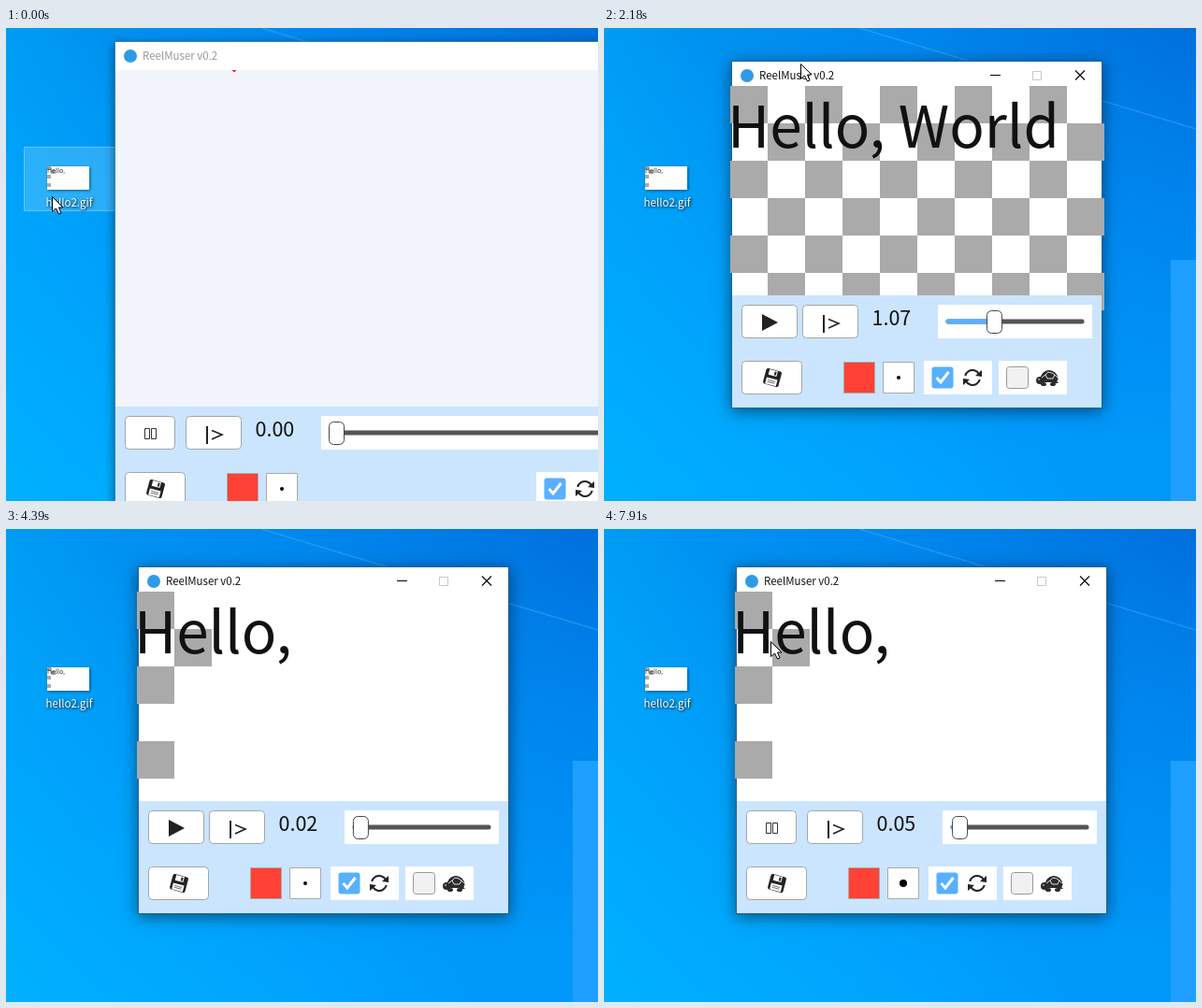
Animation of 633x506 px, one loop 7.99 s. Source, as an HTML page with a canvas:

```html
<!DOCTYPE html>
<html lang="en">
<head>
<meta charset="utf-8">
<style>
html, body { margin: 0; width: 100%; height: 100%; overflow: hidden; background: #0090ff; }
canvas { display: block; }
</style>
</head>
<body>
<canvas id="stage" width="633" height="506"></canvas>
<script>
const g = document.getElementById('stage').getContext('2d');
const FONT = '"Noto Sans CJK JP", "Noto Sans", sans-serif';
const LOOP = 7990, TICK = 78.4;
const CLIP = 3.242, CLIP_TICK = .0783; // length of the played clip, seconds per tick

// cursor path: time, x, y (y = 600 is off stage)
const PATH = [
  [0, 49, 180], [300, 60, 183], [860, 188, 166], [1010, 211, 156], [1400, 211, 156],
  [1710, 190, 17], [1840, 190, 17], [2270, 215, 43], [2400, 215, 43], [2579, 186, 160],
  [2735, 148, 332], [2900, 128, 470], [2990, 124, 510], [2991, 0, 600], [5370, 0, 600],
  [5371, 296, 67], [5480, 296, 67], [5550, 305, 67], [5760, 305, 67], [6030, 364, 495],
  [6050, 0, 600], [6180, 0, 600], [6181, 337, 421], [6340, 198, 302], [6500, 172, 318],
  [6700, 172, 318], [6960, 232, 318], [7270, 232, 318], [7430, 318, 378], [7590, 318, 378],
  [7830, 199, 110], [7910, 178, 120]
];

const clamp = x => Math.max(0, Math.min(1, x));

function cursorAt(t) {
  const i = PATH.findIndex(p => p[0] > t);
  if (i < 0) return PATH[PATH.length - 1].slice(1);
  const [t0, x0, y0] = PATH[i - 1], [t1, x1, y1] = PATH[i];
  const p = (t - t0) / (t1 - t0);
  return [Math.round(x0 + (x1 - x0) * p), Math.round(y0 + (y1 - y0) * p)];
}

function rect(x, y, w, h, fill) {
  g.fillStyle = fill;
  g.fillRect(x, y, w, h);
}

function box(x, y, w, h, r, fill, stroke) {
  g.beginPath();
  g.roundRect(x + .5, y + .5, w - 1, h - 1, r);
  g.fillStyle = fill;
  g.fill();
  if (stroke) { g.strokeStyle = stroke; g.lineWidth = 1; g.stroke(); }
}

function line(pts, color, width) {
  g.beginPath();
  for (let i = 0; i < pts.length; i += 2) g.lineTo(pts[i], pts[i + 1]);
  g.strokeStyle = color;
  g.lineWidth = width;
  g.stroke();
}

function poly(pts, fill) {
  g.beginPath();
  for (let i = 0; i < pts.length; i += 2) g.lineTo(pts[i], pts[i + 1]);
  g.closePath();
  g.fillStyle = fill;
  g.fill();
}

function dot(x, y, rx, ry, fill) {
  g.beginPath();
  g.ellipse(x, y, rx, ry, 0, 0, 7);
  g.fillStyle = fill;
  g.fill();
}

function text(s, x, y, size, fill) {
  g.font = size + 'px ' + FONT;
  g.fillStyle = fill;
  g.fillText(s, x, y);
}

function at(x, y, draw) {
  g.save();
  g.translate(x, y);
  draw();
  g.restore();
}

function shadow(color, blur, dx, dy) {
  g.shadowColor = color;
  g.shadowBlur = blur;
  g.shadowOffsetX = dx;
  g.shadowOffsetY = dy;
}

function desktop(t) {
  let grad = g.createLinearGradient(0, 0, 633, 0);
  grad.addColorStop(0, '#0098f2');
  grad.addColorStop(.5, '#0085ec');
  grad.addColorStop(1, '#0066d6');
  rect(0, 0, 633, 506, grad);
  grad = g.createLinearGradient(0, 0, 60, 506);
  grad.addColorStop(0, 'rgba(0,160,255,0)');
  grad.addColorStop(.55, 'rgba(0,155,255,.6)');
  grad.addColorStop(1, 'rgba(0,160,255,.85)');
  rect(0, 0, 633, 506, grad);
  grad = g.createLinearGradient(0, 506, 300, 250);
  grad.addColorStop(0, 'rgba(0,178,255,.9)');
  grad.addColorStop(1, 'rgba(0,178,255,0)');
  rect(0, 0, 633, 506, grad);
  line([273, 0, 633, 108], 'rgba(90,190,255,.35)', 1.5);
  rect(606, 248, 258, 258, '#1f9fff');

  if (t < 1790) box(19, 127, 104, 69, 0, `rgba(255,255,255,${t < 70 ? .17 : .24})`, 'rgba(150,215,255,.6)');
  g.save();
  shadow('rgba(0,0,0,.5)', 3, 1, 1);
  rect(44, 148, 45, 25, '#fff');
  g.restore();
  rect(44, 148, 4, 4, '#aaa');
  rect(48, 152, 5, 4, '#aaa');
  rect(44, 157, 4, 4, '#aaa');
  rect(44, 166, 4, 4, '#aaa');
  text('Hello,', 44, 155, 7, '#333');
  g.save();
  shadow('#000', 3, 1, 1);
  g.textAlign = 'center';
  text('hello2.gif', 67.5, 191, 11.5, '#fff');
  g.restore();
}

function clipView(v) {
  const n = Math.floor(v * 10 + .01);
  const cols = n ? Math.min(10, n + 1) : 2;
  rect(0, 0, 395, 220, '#fff');
  for (let c = 0; c < cols; c++)
    for (let r = c % 2; r < 6; r += 2)
      if (n || c ^ (r > 1) || r < 5 && !c) {
        if (!n && c && r > 1) continue;
        rect(c * 40 - 2, r * 40 - 4, 40, 40, '#aaa');
      }
  text('Hello, World!'.slice(0, 6 + Math.floor(n * 2 / 3)), -5, 62, 62, '#111');
}

function floppy() {
  g.rotate(.26);
  box(-9, -9, 18, 18, 2, '#222');
  rect(-5, -8, 9, 6, '#fff');
  rect(1, -7, 2, 4, '#222');
  rect(-6, 1, 12, 7, '#fff');
  line([-4, 3.5, 4, 3.5], '#777', 1);
  line([-4, 5.5, 4, 5.5], '#777', 1);
}

function repeatIcon() {
  for (let i = 0; i < 2; i++) {
    g.beginPath();
    g.arc(0, 0, 8, -2.9, -.5);
    g.strokeStyle = '#222';
    g.lineWidth = 2;
    g.stroke();
    poly([10, -8, 10, -1, 3, -2], '#222');
    g.rotate(Math.PI);
  }
}

function turtle() {
  const c = '#2b2b2b';
  dot(-8, 3, 4, 4, c);
  dot(-4, 7, 3, 2, c);
  dot(6, 7, 3, 2, c);
  poly([8, 2, 12, 6, 6, 6], c);
  g.beginPath();
  g.ellipse(2, 2, 9.5, 10, -.05, Math.PI, 0);
  g.lineTo(10, 5);
  g.lineTo(-6, 5);
  g.fill();
  line([-6, 0, -2, -3, 0, 1, 6, 1, 8, -3, 11, 0], '#ddd', 1);
  line([-2, -3, 1, -6, 5, -5, 8, -3], '#ddd', 1);
  dot(-9, 2, .8, .8, '#fff');
}

function controls(v, paused, big, brush) {
  const w = big ? 640 : 395, shift = big ? 245 : 0;
  const button = (x, y, width) => box(x, y, width, 36, 4, '#fff', '#a5a5a5');
  rect(0, 0, w, 120, '#cbe5ff');

  button(10, 10, paused ? 54 : 60);
  if (paused) {
    box(31, 23, 6, 12, 0, '#fff', '#333');
    box(38, 23, 6, 12, 0, '#fff', '#333');
  } else poly([32, 20, 32, 38, 49, 29], '#222');
  button(75, 10, 60);
  line([98, 21, 98, 40], '#222', 2);
  line([103, 25.5, 114, 30, 103, 35], '#222', 1.6);
  text(v.toFixed(2), 149.5, 32, 21.5, '#111');

  rect(220, 10, 165 + shift, 36, '#fff');
  const x = 236 + v / CLIP * 133;
  box(228, 25, 149 + shift, 6, 3, '#555');
  if (v > .03) box(228, 25, x - 228, 6, 3, '#58b0ff');
  box(x - 8, 16, 17, 25, 5, '#fff', '#444');

  button(10, 70, 65);
  at(43, 88, floppy);
  box(119, 71, 34, 34, 0, '#ff4136', '#aaa');
  box(161, 71, 34, 34, 0, '#fff', '#aaa');
  dot(178, 88, brush, brush, '#000');

  at(shift, 0, () => {
    rect(205, 70, 73, 36, '#fff');
    box(213, 76, 24, 24, 3, '#58b0ff');
    line([218.5, 88, 223, 93, 231.5, 82], '#fff', 3);
    at(257, 88, repeatIcon);
    rect(285, 70, 73, 36, '#fff');
    box(293, 76, 24, 24, 3, '#f1f1f1', '#999');
    at(337, 88, turtle);
  });
}

function appWindow(t, tick) {
  const big = t < 1000, dark = !big && t < 1150, active = t > 1790;
  const w = big ? 640 : 395, h = big ? 510 : 370, view = big ? 360 : 220;
  const paused = big || t > 4650;
  const v = big || dark ? 0 : paused ? (t > 7200 ? .05 : 0)
    : (.602 + (tick - 22) * CLIP_TICK) % CLIP;
  const drag = clamp((t - 1840) / 430);

  at(117 + Math.round(25 * drag), 15 + Math.round(26 * drag), () => {
    g.save();
    shadow('rgba(0,0,0,.5)', active ? 16 : 10, 0, 3);
    rect(-1, -1, w + 2, h + 2, active ? '#20609a' : '#3b7fb5');
    g.restore();
    rect(0, 0, w, 30, '#fff');
    dot(16, 15, 7, 7, '#2f9be8');
    text('ReelMuser v0.2', 29, 19, 11.5, active ? '#111' : '#95989d');
    if (!big) {
      const ink = active ? '#000' : '#2d6f9f';
      line([276, 14.5, 287, 14.5], active ? '#000' : '#445', 1);
      box(321, 10, 10, 10, 0, '#fff', active ? '#c8c8c8' : '#ececec');
      line([367, 9.5, 377, 19.5], ink, 1.1);
      line([377, 9.5, 367, 19.5], ink, 1.1);
    }
    if (dark) return rect(0, 30, w, 340, '#40413f');
    at(0, 30, () => {
      if (big) {
        rect(0, 0, w, view, '#f1f5fb');
        rect(125, 0, 4, 1, '#f22');
        rect(126, 1, 2, 1, '#f22');
      } else clipView(v);
    });
    at(0, 30 + view, () => controls(v, paused, big, t > 7500 ? 4 : 2));
  });
}

function cursor(t) {
  const [x, y] = cursorAt(t);
  const hand = t > 6300 && t < 7620;
  at(x + .5, y + .5, () => {
    const shape = new Path2D(hand
      ? 'M5 11V2Q5 0 6.5 0T8 2V8Q11 6 11.5 9Q14 7.500 14.500 10Q17 9 17 12V16Q17 20 15 23H6.500Q5 18 2 15Q-.5 12 1.500 11Q3 10 5 13Z'
      : 'M0 0V16L4 12.500L7 18.500L9.500 17.500L7 11.500H11.500Z');
    g.fillStyle = '#fff';
    g.fill(shape);
    g.strokeStyle = '#000';
    g.lineWidth = 1;
    g.stroke(shape);
    if (hand) {
      line([8, 8, 8, 12], '#000', 1);
      line([11.5, 9, 11.5, 12], '#000', 1);
      line([14.5, 10, 14.5, 13], '#000', 1);
    }
  });
}

function frame(now) {
  const tick = Math.min(101, Math.floor((now % LOOP - 70) / TICK + 1.15));
  const t = tick ? 70 + TICK * (tick - 1) : 0;
  desktop(t);
  appWindow(t, tick);
  cursor(t);
  requestAnimationFrame(frame);
}
requestAnimationFrame(frame);
</script>
</body>
</html>
```
